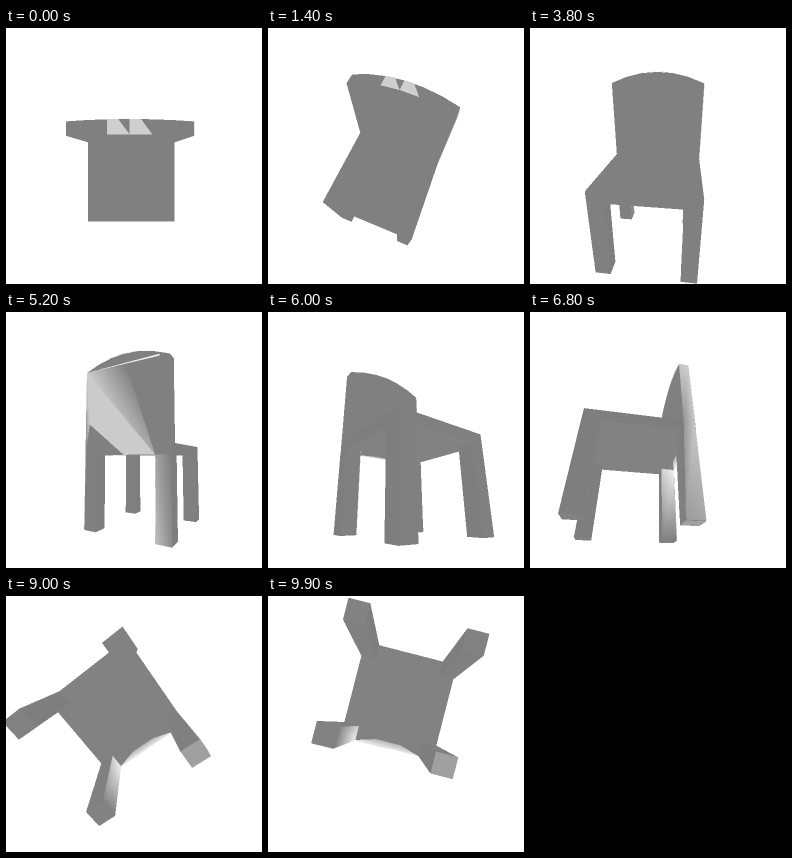
Animation, 256 px wide and 256 px high, one loop 10000 ms. Source, as an HTML page with a canvas:

```html
<!DOCTYPE html>
<html>
<head>
<meta charset="utf-8">
<title>Turning chair</title>
<style>
html, body { margin: 0; width: 100%; height: 100%; overflow: hidden; background: #fff; }
canvas { display: block; width: 256px; height: 256px; }
</style>
</head>
<body>
<canvas id="view" width="512" height="512"></canvas>
<script>
const SIZE = 512, FOCAL = 221.7 * 2, DIST = 2.506;
const STEPS = 100, STEP_MS = 100, RAD = Math.PI / 180;
const ctx = document.getElementById('view').getContext('2d');
const image = ctx.createImageData(SIZE, SIZE);
const pixels = new Uint32Array(image.data.buffer);
const nearness = new Float32Array(SIZE * SIZE);

// Chair measures, seat width = 1
const LEFT = -0.532, RIGHT = 0.468, REAR = -0.27, FRONT = 0.76;
const FLOOR = -0.982, UNDER = -0.17, SEAT = -0.06, SHOULDER = 0.774;
const LEG = 0.155, BACK = REAR + 0.112, ARCH = 0.114, SEGMENTS = 6, LIFT = 0.004;
const GREY = 128, LIT = 203;

const faces = [];
const face = (points, shades) => faces.push({
  points, shades: Array.isArray(shades) ? shades : points.map(() => shades)
});

function box(x0, x1, y0, y1, z0, z1) {
  face([[x0, y0, z0], [x1, y0, z0], [x1, y0, z1], [x0, y0, z1]], GREY + 2);
  face([[x0, y1, z0], [x1, y1, z0], [x1, y1, z1], [x0, y1, z1]], GREY);
  for (const z of [z0, z1])
    face([[x0, y0, z], [x1, y0, z], [x1, y1, z], [x0, y1, z]], GREY);
  for (const x of [x0, x1])
    face([[x, y0, z0], [x, y1, z0], [x, y1, z1], [x, y0, z1]], GREY - 2);
}

function buildChair() {
  box(LEFT, RIGHT, UNDER, SEAT, REAR, FRONT);
  for (const x of [LEFT, RIGHT - LEG])
    for (const z of [REAR, FRONT - LEG])
      box(x, x + LEG, FLOOR, UNDER, z, z + LEG);

  // Backrest with arched top
  const archX = i => LEFT + i / SEGMENTS;
  const archY = i => SHOULDER + ARCH * (1 - (2 * i / SEGMENTS - 1) ** 2);
  const top = (i, z, lift = 0) => [archX(i), archY(i) + lift, z];
  for (let i = 0; i < SEGMENTS; i++) {
    for (const z of [REAR, BACK])
      face([[archX(i), UNDER, z], [archX(i + 1), UNDER, z], top(i + 1, z), top(i, z)], GREY);
    face([top(i, REAR), top(i + 1, REAR), top(i + 1, BACK), top(i, BACK)], GREY);
  }
  for (const x of [LEFT, RIGHT])
    face([[x, SEAT, REAR], [x, SHOULDER, REAR], [x, SHOULDER, BACK], [x, SEAT, BACK]], GREY);

  // Lit patches on the arch
  for (const i of [2, 3])
    face([top(i, REAR, LIFT), top(i + 0.5, REAR, LIFT), top(i + 1, BACK, LIFT), top(i, BACK, LIFT)], 207);

  // Lit rear panel, fading towards the upper left
  const inner = LEFT + LEG;
  const rear = (x, y) => [x, y, REAR - LIFT];
  const shoulder = rear(RIGHT, SHOULDER), hip = rear(RIGHT - 0.055, 0.17);
  const corner = rear(inner, UNDER);
  face([shoulder, hip, rear(-0.03, UNDER), corner], LIT);
  face([shoulder, hip, rear(RIGHT, UNDER)], [LIT, LIT, GREY]);
  face([shoulder, rear(-0.05, SHOULDER), corner], [LIT, GREY, 165]);
  face([shoulder, rear(-0.43, SHOULDER), rear(-0.43, SHOULDER + 0.02)], 235);
  face([corner, rear(inner, FLOOR), rear(LEFT, FLOOR), rear(LEFT, UNDER)],
    [165, 190, 140, GREY]);

  // Lit inner side of the left rear leg
  const inside = inner + LIFT;
  face([[inside, UNDER, REAR], [inside, UNDER, REAR + LEG],
    [inside, FLOOR, REAR + LEG], [inside, FLOOR, REAR]], [238, 210, GREY, GREY]);

  // Lit right edge and foot
  const side = RIGHT + LIFT;
  face([[side, SHOULDER, REAR], [side, SHOULDER, BACK], [side, SEAT, BACK], [side, SEAT, REAR]],
    [208, 200, 150, 200]);
  face([[side, SEAT, REAR], [side, SEAT, BACK], [side, FLOOR, REAR + LEG], [side, FLOOR, REAR]],
    [200, 150, 155, 165]);
  const foot = FLOOR - LIFT;
  face([[RIGHT, foot, REAR], [RIGHT - LEG, foot, REAR],
    [RIGHT - LEG, foot, REAR + LEG], [RIGHT, foot, REAR + LEG]], 160);

  // Pale strip under the back of the seat
  const low = UNDER - LIFT;
  face([[inner, low, REAR], [RIGHT - LEG, low, REAR], [0.1, low, -0.205], [-0.16, low, -0.205]],
    [235, 235, 180, 180]);
}

function fillTriangle(a, b, c) {
  const edge = (p, q, x, y) => (q.x - p.x) * (y - p.y) - (q.y - p.y) * (x - p.x);
  const area = edge(a, b, c.x, c.y);
  if (Math.abs(area) < 1e-6) return;
  const low = key => Math.max(0, Math.floor(Math.min(a[key], b[key], c[key])));
  const high = key => Math.min(SIZE - 1, Math.ceil(Math.max(a[key], b[key], c[key])));
  const x0 = low('x'), x1 = high('x'), y0 = low('y'), y1 = high('y');
  for (let y = y0; y <= y1; y++) {
    for (let x = x0; x <= x1; x++) {
      const u = edge(b, c, x + 0.5, y + 0.5) / area;
      const v = edge(c, a, x + 0.5, y + 0.5) / area;
      const w = 1 - u - v;
      if (u < 0 || v < 0 || w < 0) continue;
      const near = u * a.near + v * b.near + w * c.near, at = y * SIZE + x;
      if (near <= nearness[at]) continue;
      nearness[at] = near;
      const grey = Math.round(u * a.shade + v * b.shade + w * c.shade);
      pixels[at] = 0xff000000 | grey * 0x10101;
    }
  }
}

function render(step) {
  // The view flips over at both poles
  const pole = step === 0 || step === STEPS - 1;
  const turn = ((pole ? 0 : 180) + step * 360 / STEPS * 4) * RAD;
  const tilt = (90 - 180 * step / (STEPS - 1)) * RAD;
  const sinA = Math.sin(turn), cosA = Math.cos(turn);
  const sinE = Math.sin(tilt), cosE = Math.cos(tilt);

  pixels.fill(0xffffffff);
  nearness.fill(0);
  for (const { points, shades } of faces) {
    const p = points.map(([x, y, z], i) => {
      const toward = x * sinA + z * cosA;
      const near = 1 / (DIST - toward * cosE - y * sinE);
      return {
        x: SIZE / 2 + FOCAL * near * (x * cosA - z * sinA),
        y: SIZE / 2 - FOCAL * near * (y * cosE - toward * sinE),
        near,
        shade: shades[i]
      };
    });
    for (let i = 2; i < p.length; i++) fillTriangle(p[0], p[i - 1], p[i]);
  }
  ctx.putImageData(image, 0, 0);
}

buildChair();
const start = performance.now();
let shown = -1;
function tick() {
  const step = Math.floor((performance.now() - start) / STEP_MS) % STEPS;
  if (step !== shown) render(shown = step);
  requestAnimationFrame(tick);
}
tick();
</script>
</body>
</html>
```
